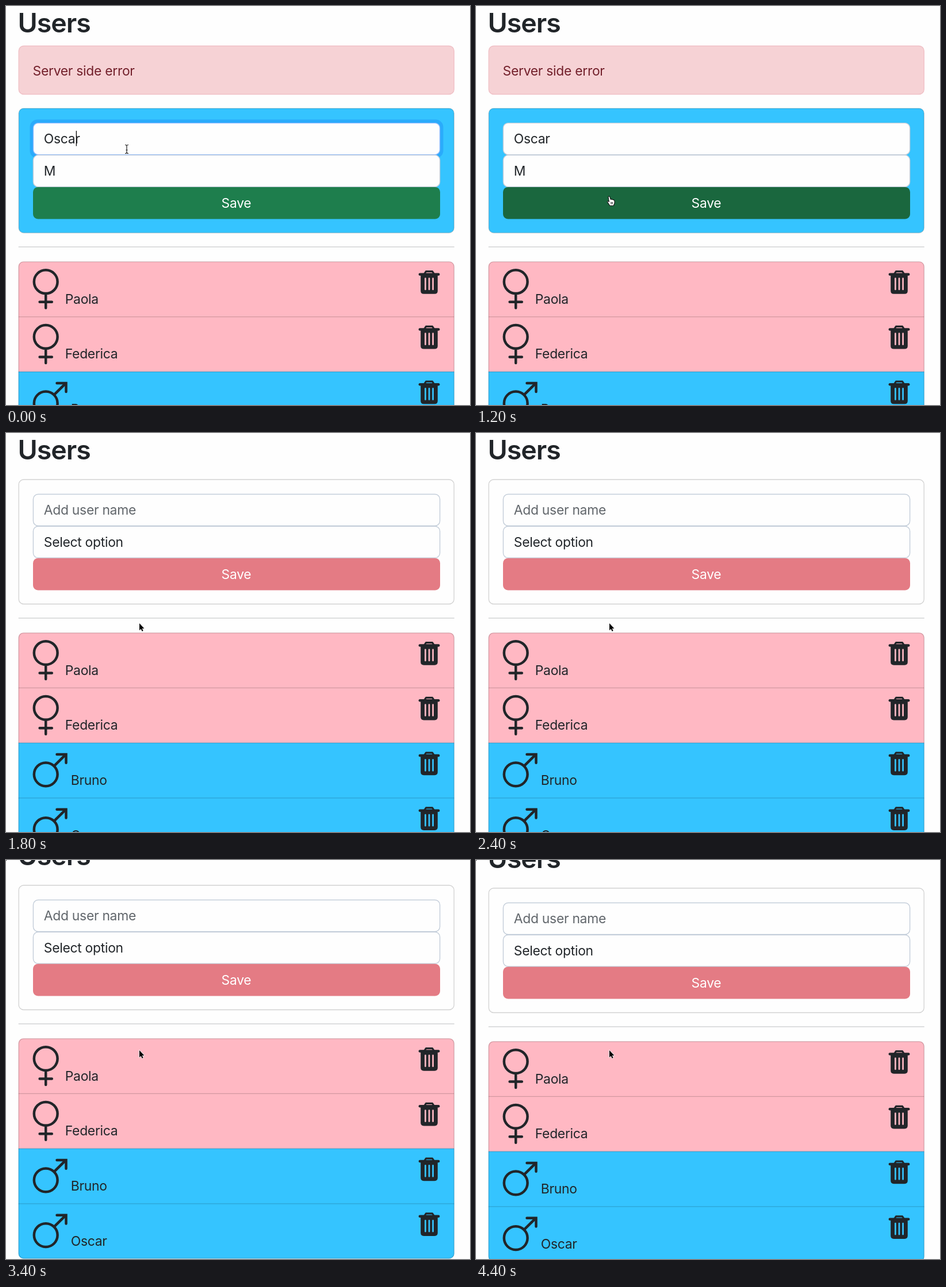
These frames come from a looping animation (807x694 px, 4600 ms). An HTML page:

```html
<!DOCTYPE html>
<html lang="en">
<head>
<meta charset="utf-8">
<title>Users</title>
<style>
html, body { margin: 0; width: 100%; height: 100%; overflow: hidden; background: #fefefe; }
svg { display: block; width: 807px; height: 694px; }
text { font: 400 22.9px Inter, "Open Sans", sans-serif; letter-spacing: -.3px; fill: #212529; }
#title { font-weight: 600; font-size: 46.5px; letter-spacing: -1px; }
.edge { fill: none; stroke: rgba(0, 0, 0, .176); stroke-width: 1.3; }
.field { fill: #fefefe; stroke: #c3cdd9; stroke-width: 1.4; }
.icon { fill: none; stroke: #212529; stroke-width: 4.5; stroke-linecap: round; stroke-linejoin: round; }
</style>
</head>
<body>
<svg viewBox="0 0 807 694">
  <defs>
    <clipPath id="listShape"><rect x="21.7" width="757.8" height="383" rx="8.5"/></clipPath>
    <g id="female" class="icon">
      <circle cx="69.2" cy="35.3" r="20.4"/>
      <path d="M69.2 56V80.8M58.6 70.3H79.8"/>
    </g>
    <g id="male" class="icon">
      <circle cx="69.2" cy="55" r="20.4"/>
      <path d="M84 40L104 20.3" stroke-linecap="butt"/>
      <path d="M88.5 20.2H104.5V35" stroke-linejoin="miter"/>
    </g>
    <g id="trash">
      <path d="M719.8 22.3H752.2" class="icon" stroke-width="4"/>
      <path d="M728 21L730.5 17.3H741.5L744 21" class="icon" style="stroke-width:3.2"/>
      <path d="M721.2 23H750.8V51Q750.8 56.4 745.4 56.4H726.6Q721.2 56.4 721.2 51Z" fill="#212529"/>
      <path d="M729.4 29.5V48.5M736 29.5V48.5M742.6 29.5V48.5" stroke="currentColor" stroke-width="2.7" stroke-linecap="round"/>
    </g>
  </defs>
  <rect width="807" height="694" fill="#fefefe"/>
  <g id="page">
    <text id="title" x="20.6" y="46.4">Users</text>
    <g id="alert">
      <rect x="22.2" y="69.5" width="757" height="84" rx="8.5" fill="#f6d2d5" stroke="#efbfc5" stroke-width="1.3"/>
      <text x="46.6" y="120.6" style="fill:#721f2a">Server side error</text>
    </g>
    <g id="content">
      <rect id="card" x="22.2" y=".5" width="757" height="216.5" rx="8.5"/>
      <rect class="edge" x="22.2" y=".5" width="757" height="216.5" rx="8.5"/>
      <rect id="ring" x="41.5" y="20" width="719" height="67" rx="13" fill="#2aabfb"/>
      <rect class="field" id="nameField" x="47.4" y="26" width="707.2" height="55" rx="8.5"/>
      <rect class="field" x="47.4" y="81.8" width="707.2" height="55" rx="8.5"/>
      <text id="name" x="65.8" y="61.3"></text>
      <path id="caret" d="M122.4 39.5V66" stroke="#111" stroke-width="1.4"/>
      <text id="option" x="65.8" y="117.3"></text>
      <rect id="button" x="47" y="137.3" width="708" height="55.7" rx="8.5"/>
      <text id="save" x="400.5" y="173" text-anchor="middle">Save</text>
      <path d="M21.7 241.5H779.7" stroke="#d2d3d5" stroke-width="1.5"/>
      <g transform="translate(0 266.8)">
        <g id="list" clip-path="url(#listShape)"></g>
        <rect class="edge" x="22.2" y=".5" width="757" height="382" rx="8.5"/>
      </g>
    </g>
  </g>
  <g id="pointer">
    <path id="beam" d="M-3-7.5Q0-7.5 0-5.5Q0-7.5 3-7.5M0-5.5V5.5M-3 7.5Q0 7.5 0 5.5Q0 7.5 3 7.5M-1.5 1.5H1.5" fill="none" stroke="#222" stroke-width="1.2"/>
    <path id="arrow" d="M0 0V12.2L2.7 9.7L4.7 14L6.6 13.1L4.7 9H8.4Z" fill="#000" stroke="#fff" stroke-width="1.1" paint-order="stroke"/>
    <path id="hand" d="M-4-7Q-2.6-9-1.2-7L.2-2.6Q1.7-3.8 2.7-2.2Q4-3.2 5-1.5Q7-2 7 .6V4L5.3 8.2H-1.2L-5.2 2.4Q-6 .3-3.6.6L-2.6 1.5Z M1 2V5.5M3.2 2V5.5" fill="#fff" stroke="#111" stroke-width="1.1" stroke-linejoin="round"/>
  </g>
  <rect id="dot" width="1" height="1"/>
</svg>
<script>
const LOOP = 4600, STEP = 200;
const BLUE = '#35c4ff', PINK = '#ffb8c3', ROW = 95.75;
const el = id => document.getElementById(id);
const users = [['Paola', 'female'], ['Federica', 'female'], ['Bruno', 'male'], ['Oscar', 'male']];

el('list').innerHTML = users.map(([name, kind], i) => {
  const female = kind === 'female', color = female ? PINK : BLUE;
  return `<g transform="translate(0 ${i * ROW})" color="${color}">
    <rect x="21" width="760" height="${ROW + 1}" fill="${color}"/>
    ${i ? '<path class="edge" d="M22 .4H779"/>' : ''}
    <use href="#${kind}"/><use href="#trash"/>
    <text x="${female ? 102.8 : 112.8}" y="73.3">${name}</text></g>`;
}).join('');

// Each entry lists only what changes at that time (ms).
const changes = {
  0: { filled: true, focus: true, caret: true, card: BLUE, button: '#1e7e4d', save: '#fff',
       scroll: 0, pointer: ['beam', 210, 249] },
  200: { pointer: ['beam', 229, 257] },
  400: { pointer: ['arrow', 231, 295] },
  600: { caret: false, button: '#1c7346', pointer: ['hand', 234, 331] },
  800: { button: '#1a673e', pointer: ['hand', 234, 339] },
  1000: { focus: false },
  1400: { filled: false, card: '#3fc7ff', button: '#2c827f', save: '#bfeaf3', pointer: ['arrow', 232, 331] },
  1600: { card: '#bfe9ff', button: '#d3788a', save: '#f5fbff' },
  1800: { card: '#fefefe', button: '#e47b84', save: '#fff' },
  2600: { scroll: 26 },
  2800: { scroll: 36 },
  3000: { scroll: 37 },
  3400: { dot: true },
  3600: { scroll: 35 },
  3800: { scroll: 33 },
  4000: { scroll: 32 }
};
const states = [];
for (let t = 0, s = {}; t < LOOP; t += STEP) states.push(s = { ...s, ...changes[t] });

const show = (id, on) => el(id).style.display = on ? '' : 'none';

function render(s) {
  el('page').setAttribute('transform', `translate(0 ${-s.scroll})`);
  el('content').setAttribute('transform', `translate(0 ${s.filled ? 177.6 : 80.5})`);
  show('alert', s.filled);
  show('ring', s.focus);
  show('caret', s.caret);
  show('dot', s.dot);
  el('nameField').style.stroke = s.focus ? '#86b7fe' : '';
  el('name').textContent = s.filled ? 'Oscar' : 'Add user name';
  el('name').style.fill = s.filled ? '' : '#61666b';
  el('option').textContent = s.filled ? 'M' : 'Select option';
  el('card').style.fill = s.card;
  el('button').style.fill = s.button;
  el('save').style.fill = s.save;
  const [kind, x, y] = s.pointer;
  for (const id of ['beam', 'arrow', 'hand']) show(id, id === kind);
  el('pointer').setAttribute('transform', `translate(${x} ${y})`);
}

const start = performance.now();
let current;
function tick(now) {
  const state = states[Math.floor(Math.max(0, now - start) % LOOP / STEP)];
  if (state !== current) render(current = state);
  requestAnimationFrame(tick);
}
tick(start);
</script>
</body>
</html>
```
